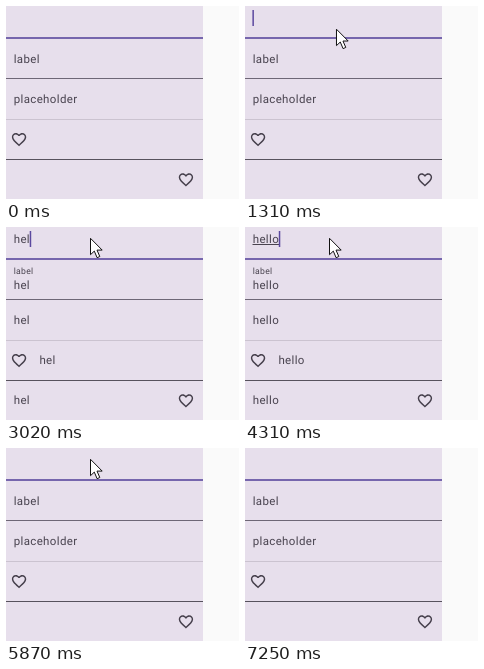
Animation of 233 by 193 pixels, one loop 7610 ms. Source, as an HTML page:

```html
<!DOCTYPE html>
<html lang="en">
<head>
<meta charset="utf-8">
<title>Text fields</title>
<style>
  html, body { margin: 0; width: 100%; height: 100%; overflow: hidden; background: #fafafa; }
  svg { display: block; width: 233px; height: 193px; }
  text {
    font: 11.5px Roboto, sans-serif;
    letter-spacing: .36px;
    text-rendering: geometricPrecision;
    fill: #49434f;
  }
  .icon { fill: #453f4b; }
</style>
</head>
<body>
<svg viewBox="0 0 233 193">
  <defs>
    <path id="heart" d="M16.5 3c-1.74 0-3.41.81-4.5 2.09C10.91 3.81 9.24 3 7.5 3 4.42 3 2 5.42 2 8.5c0 3.78 3.4 6.86 8.55 11.54L12 21.35l1.45-1.32C18.6 15.36 22 12.28 22 8.5 22 5.42 19.58 3 16.5 3zm-4.4 15.55l-.1.1-.1-.1C7.14 14.24 4 11.39 4 8.5 4 6.5 5.5 5 7.5 5c1.54 0 3.04.99 3.57 2.36h1.87C13.46 5.99 14.96 5 16.5 5c2 0 3.5 1.5 3.5 3.5 0 2.89-3.14 5.74-7.9 10.05z"/>
  </defs>
  <rect width="197" height="193" fill="#e7dfec"/>
  <rect y="31.2" width="197" height="1.6" fill="#5b499f"/>
  <rect y="72" width="197" height="1" fill="#6e6776"/>
  <rect y="113" width="197" height="1" fill="#cbc3d0"/>
  <rect y="153" width="197" height="1" fill="#57525d"/>
  <use href="#heart" class="icon" transform="translate(4.4 124.8) scale(.72)"/>
  <use href="#heart" class="icon" transform="translate(171.3 165.1) scale(.72)"/>

  <text id="label">label</text>
  <text id="placeholder" x="7.7" y="97">placeholder</text>
  <text class="value" x="7.7" y="16.3"></text>
  <text class="value" x="7.7" y="62.2"></text>
  <text class="value" x="7.7" y="97"></text>
  <text class="value" x="33.4" y="137.2"></text>
  <text class="value" x="7.7" y="177.3"></text>
  <rect id="underline" x="7.5" y="17" width="26.5" height="1" fill="#49434f"/>
  <rect id="caret" y="4" width="1.5" height="16" fill="#5b499f"/>
  <path id="mouse" d="M.5.3V16.7L4.3 13.1 7.1 19.7 9.8 18.5 7 12.1H12.2Z" fill="#fff" stroke="#111" stroke-linejoin="round"/>
</svg>
<script>
const LOOP = 7610, START = 410, END = 7250;
const WORD = 'hello', BLINK = 480;
const typing = { from: 2620, step: 182 };
const erasing = { from: 4670, step: 166 };
const keyTime = (run, n) => run.from + run.step * n;
const lastTyped = keyTime(typing, WORD.length - 1);
const lastErased = keyTime(erasing, WORD.length - 1);

// Pointer tip: time, x, y
const route = [
  [START, 145, 178], [1090, 97, 29], [1310, 91, 23], [1640, 85, 0],
  [1930, 84, 11], [6350, 84, 11], [6560, 123, 44], [END, 220, 193]
];

const $ = id => document.getElementById(id);
const label = $('label'), placeholder = $('placeholder'), underline = $('underline');
const caret = $('caret'), mouse = $('mouse');
const values = document.querySelectorAll('.value');
const clamp = (v, max = 1) => Math.min(max, Math.max(0, v));
const mix = (a, b, k) => a + (b - a) * k;
const within = (t, a, b) => t >= a && t < b;
const show = (el, on) => el.setAttribute('visibility', on ? 'visible' : 'hidden');
const keysHit = (run, t) => clamp(Math.floor((t - run.from) / run.step) + 1, WORD.length);

// cubic-bezier(.2, 0, 0, 1)
function ease(x) {
  let lo = 0, hi = 1;
  for (let i = 0; i < 16; i++) {
    const s = (lo + hi) / 2;
    if (.6 * s * (1 - s) ** 2 + s ** 3 < x) lo = s; else hi = s;
  }
  return 3 * lo * lo * (1 - lo) + lo ** 3;
}

// Blinking restarts after each run of keys; the caret stays lit until then.
function caretLit(t) {
  const restart = t < typing.from ? START - 80 : t < erasing.from ? lastTyped : lastErased + 50;
  return within(t, START, END) && Math.floor(Math.max(0, t - restart) / BLINK) % 2 === 0;
}

function drawFields(t) {
  const text = WORD.slice(0, keysHit(typing, t) - keysHit(erasing, t));
  if (values[0].textContent !== text) values.forEach(v => v.textContent = text);

  const lift = ease(clamp((t - typing.from) / 150)) - ease(clamp((t - lastErased) / 180));
  label.setAttribute('transform',
    `translate(7.7 ${mix(56.9, 47, lift)}) scale(${mix(1, .75, lift)})`);
  placeholder.setAttribute('opacity', t < typing.from ? 1 : clamp((t - lastErased - 120) / 80));

  show(underline, within(t, lastTyped + 190, erasing.from));
  caret.setAttribute('x', 7.4 + (text ? values[0].getComputedTextLength() : 0));
  show(caret, caretLit(t));
}

function drawMouse(t) {
  const visible = within(t, START, END);
  show(mouse, visible);
  if (!visible) return;
  const i = route.findIndex(p => t < p[0]);
  const [t0, x0, y0] = route[i - 1], [t1, x1, y1] = route[i];
  const k = (t - t0) / (t1 - t0);
  mouse.setAttribute('transform', `translate(${mix(x0, x1, k)} ${mix(y0, y1, k)})`);
}

function frame() {
  const t = performance.now() % LOOP;
  drawFields(t);
  drawMouse(t);
  requestAnimationFrame(frame);
}
frame();
</script>
</body>
</html>
```
